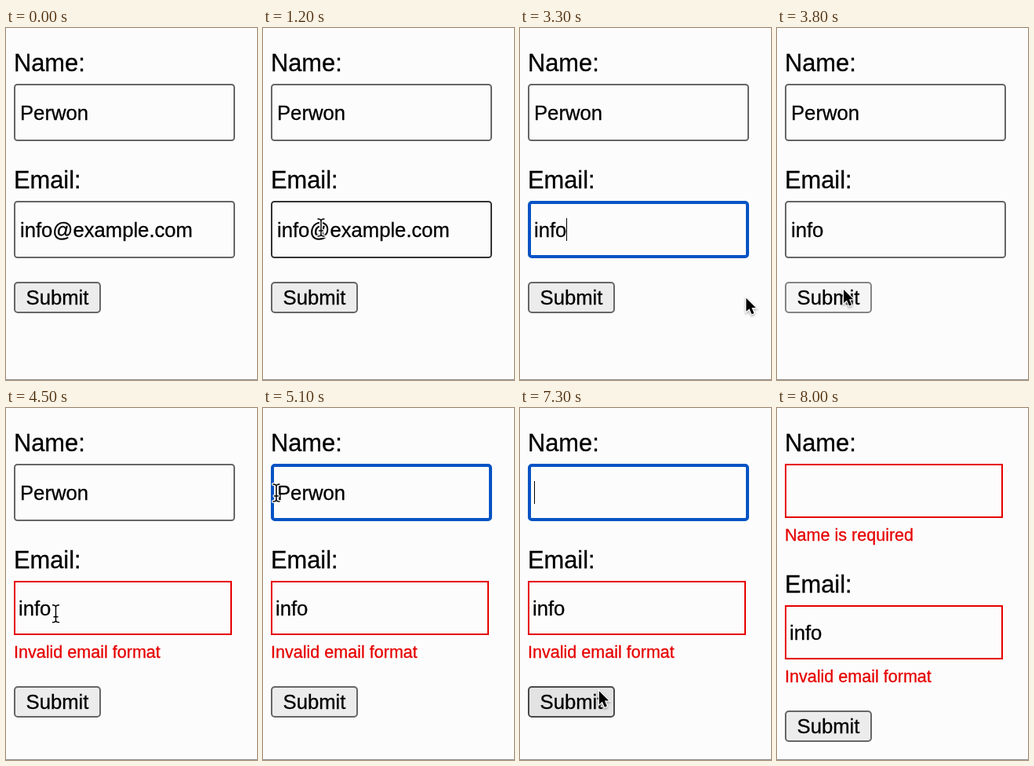
An HTML page with a canvas that plays this animation: 320 px wide and 448 px high, repeating every 8.7 s.

```html
<!DOCTYPE html>
<html lang="en">
<head>
<meta charset="utf-8">
<title>Form validation</title>
<style>
  html, body { margin: 0; width: 100%; height: 100%; overflow: hidden; background: #fcfcfc; }
  canvas { display: block; width: 320px; height: 448px; }
</style>
</head>
<body>
<canvas id="stage" width="320" height="448"></canvas>
<script>
const ctx = document.getElementById('stage').getContext('2d');
const LOOP = 8700, STEP = 100;
const FONT = '"Liberation Sans", Arial, sans-serif';
const ROOT = 30.8, CONTROL = ROOT / 1.2, NOTE = ROOT * 0.7;
const FIELD_GAP = 149, NOTE_HEIGHT = 31;
const NAME = 'Perwon', USER = 'info', EMAIL = USER + '@example.com';
const PAPER = '#fcfcfc', RED = '#e60000', BLUE = '#0653c4', GREY = '#666', DARK = '#333';

const at = {
  appear: 600, emailHover: 1200, emailClick: 1600, emailDrag: 1900, emailOut: 2200, domainCut: 2900,
  submitTrip: 3200, submitDown: 3800, submitUp: 3900, nameTrip: 4200, nameClick: 5000,
  nameDrag: 5200, nameOut: 6000, nameCut: 6200,
  lastTrip: 6800, lastDown: 7500, lastUp: 7600, vanish: 8000
};

const spot = {
  top: [170, 40], low: [110, 322], email: [74, 254], userEnd: [59, 254], right: [330, 285],
  edge: [312, 345], submit: [85, 333], nameStart: [17, 108], corner: [300, 300],
  submitLow: [85, 365], away: [70, 340]
};

// Pointer moves: [start, end, from, to]
const moves = [
  [at.appear, 1000, spot.top, spot.low],
  [1000, at.emailHover, spot.low, spot.email],
  [1300, at.emailClick, spot.email, spot.userEnd],
  [at.emailDrag - STEP, at.emailOut, spot.userEnd, spot.right],
  [at.submitTrip, at.submitDown - STEP, spot.edge, spot.submit],
  [at.nameTrip, at.nameClick, spot.submit, spot.nameStart],
  [at.nameDrag - STEP, at.nameOut, spot.nameStart, spot.corner],
  [at.lastTrip, at.lastDown - STEP, spot.corner, spot.submitLow],
  [at.lastUp, at.vanish, spot.submitLow, spot.away]
];

const between = (t, a, b) => t >= a && t < b;
const ease = k => k * k * (3 - 2 * k);

function pointerAt(t) {
  const shown = between(t, at.appear, at.emailOut) || between(t, at.submitTrip, at.nameOut) ||
    between(t, at.lastTrip, at.vanish);
  if (!shown) return null;
  const [start, end, from, to] = moves.filter(m => m[0] <= t).pop();
  const k = ease(Math.min(1, (t - start) / (end - start)));
  const [x, y] = from.map((v, i) => v + (to[i] - v) * k);
  return { x, y };
}

const inside = (p, x, y, w, h) => !!p && p.x >= x && p.x <= x + w && p.y >= y && p.y <= y + h;

function widthOf(str) {
  ctx.font = CONTROL + 'px ' + FONT;
  return ctx.measureText(str).width;
}

// A hairline outline gives the slightly heavier smoothing of desktop text
function text(str, x, y, size, color = '#000') {
  ctx.font = size + 'px ' + FONT;
  ctx.fillStyle = ctx.strokeStyle = color;
  ctx.lineWidth = 0.3;
  ctx.fillText(str, x, y);
  ctx.strokeText(str, x, y);
}

function frame(x, y, w, h, r, line, stroke, fill) {
  ctx.beginPath();
  ctx.roundRect(x + line / 2, y + line / 2, w - line, h - line, r);
  ctx.fillStyle = fill;
  ctx.fill();
  ctx.lineWidth = line;
  ctx.strokeStyle = stroke;
  ctx.stroke();
}

// Number of characters that end left of x
const charsBefore = (str, x) =>
  [...str].filter((c, i) => widthOf(str.slice(0, i + 1)) - widthOf(c) / 2 < x).length;

function field(top, f, pointer) {
  const boxTop = top + 71;
  const left = f.error && !f.focus ? 16 : 18;
  const base = top + (left === 16 ? 114.5 : 116.5);
  const offset = n => widthOf(f.value.slice(0, n));

  text(f.label, 10, top + 55, ROOT);
  if (f.focus) frame(10, boxTop, 282, 73, 3, 4, BLUE, PAPER);
  else if (f.error) frame(10, boxTop, 278, 69, 0, 2, RED, PAPER);
  else frame(10, boxTop, 282, 73, 3.5, 2, inside(pointer, 10, boxTop, 282, 73) ? DARK : GREY, PAPER);

  if (f.selection) {
    const [a, b] = f.selection.map(offset);
    ctx.fillStyle = '#a9d0fb';
    ctx.fillRect(left + a, top + 92.5, b - a, 29);
  }
  text(f.value, left, base, CONTROL);
  if (f.caret !== undefined) {
    ctx.fillStyle = '#000';
    ctx.fillRect(Math.round(left + offset(f.caret)), top + 93, 1, 29);
  }
  if (f.error) text(f.error, 10, top + 168.5, NOTE, RED);
}

function button(top, pressed, pointer) {
  const hover = inside(pointer, 10, top, 111, 40);
  const [edge, fill] = pressed ? ['#858585', '#f5f5f5'] : hover ? ['#4a4a4a', '#e3e3e3'] : [GREY, '#ececec'];
  frame(10, top, 111, 40, 4, 2, edge, fill);
  text('Submit', 25.6, top + 29, CONTROL);
}

function beam({ x, y }) {
  const half = 11, serif = 4;
  ctx.save();
  ctx.lineCap = ctx.lineJoin = 'round';
  ctx.beginPath();
  ctx.moveTo(x, y - half + 3);
  ctx.lineTo(x, y + half - 3);
  ctx.moveTo(x - 2.5, y + serif);
  ctx.lineTo(x + 2.5, y + serif);
  for (const end of [y - half, y + half]) {
    for (const side of [-serif, serif]) {
      ctx.moveTo(x + side, end);
      ctx.quadraticCurveTo(x, end, x, end + (y - end) / 4);
    }
  }
  for (const [color, line] of [['#fff', 4], ['#000', 1.5]]) {
    ctx.strokeStyle = color;
    ctx.lineWidth = line;
    ctx.stroke();
  }
  ctx.restore();
}

function arrow({ x, y }) {
  const shape = new Path2D('M0 0V17L4 13.5L7 20.5L10 19.2L7 12.3H12.3Z');
  ctx.save();
  ctx.translate(x, y);
  ctx.shadowColor = 'rgba(0,0,0,.35)';
  ctx.shadowBlur = 3;
  ctx.shadowOffsetY = 1.5;
  ctx.lineWidth = 2.4;
  ctx.strokeStyle = '#fff';
  ctx.stroke(shape);
  ctx.shadowColor = 'transparent';
  ctx.fillStyle = '#000';
  ctx.fill(shape);
  ctx.restore();
}

function render(t) {
  const pointer = pointerAt(t);
  const reach = str => pointer ? charsBefore(str, pointer.x - 18) : str.length;
  const name = { label: 'Name:', value: t < at.nameCut ? NAME : '' };
  const email = { label: 'Email:', value: t < at.domainCut ? EMAIL : USER };

  email.focus = between(t, at.emailClick, at.submitDown);
  name.focus = between(t, at.nameClick, at.lastDown);
  if (t >= at.submitUp) email.error = 'Invalid email format';
  if (t >= at.lastUp) name.error = 'Name is required';

  if (between(t, at.emailDrag, at.domainCut)) {
    email.selection = [USER.length, Math.max(USER.length, reach(EMAIL))];
  } else if (email.focus) {
    email.caret = USER.length;
  }
  if (between(t, at.nameDrag, at.nameCut)) name.selection = [0, reach(NAME)];
  else if (name.focus && !name.value) name.caret = 0;

  const emailTop = FIELD_GAP + (name.error ? NOTE_HEIGHT : 0);
  const buttonTop = emailTop + 174 + (email.error ? NOTE_HEIGHT : 0);
  const pressed = between(t, at.submitDown, at.submitUp) || between(t, at.lastDown, at.lastUp);

  ctx.fillStyle = PAPER;
  ctx.fillRect(0, 0, 320, 448);
  ctx.fillStyle = '#8c8c8c';
  ctx.fillRect(0, 447, 320, 1);
  field(0, name, pointer);
  field(emailTop, email, pointer);
  button(buttonTop, pressed, pointer);

  if (pointer) {
    const dragging = between(t, at.emailDrag, at.emailOut) || between(t, at.nameDrag, at.nameOut);
    const overText = [0, emailTop].some(top =>
      inside(pointer, 10, top + 71, 282, 73) || inside(pointer, 10, top + 28, 90, 34));
    (dragging || overText ? beam : arrow)(pointer);
  }
}

function tick() {
  const t = performance.now() % LOOP;
  render(Math.floor(t / STEP) * STEP);
  requestAnimationFrame(tick);
}
tick();
</script>
</body>
</html>
```
